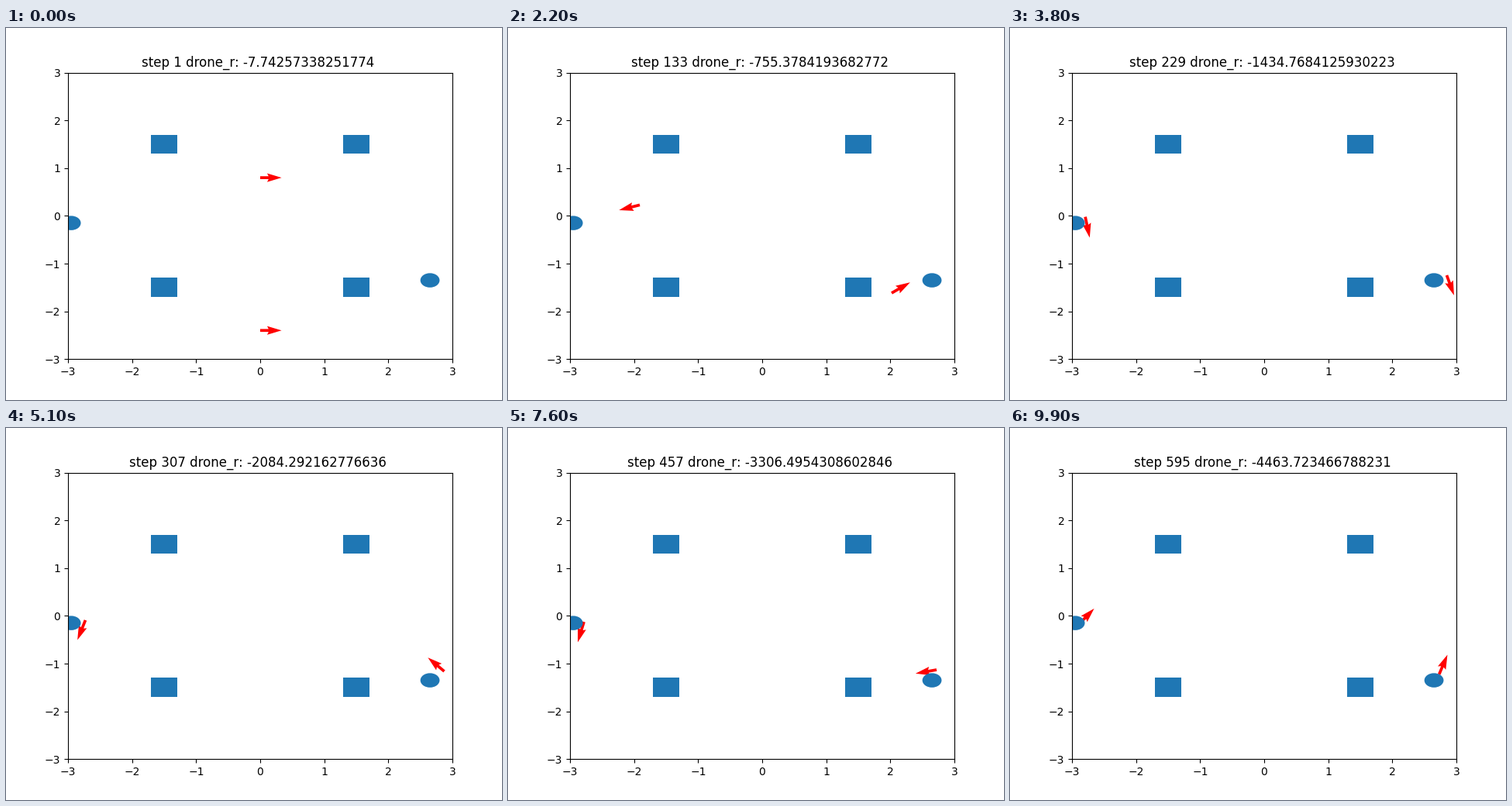
Animation of 640x480 px, one loop 10000 ms. Source, as a matplotlib script:

```python
import numpy as np
import matplotlib.pyplot as plt
from matplotlib.animation import FuncAnimation
from matplotlib.patches import Circle, Rectangle

FRAMES, STEP = 100, 6
SPIN = 50      # degrees turned per frame while circling a goal
ORBIT = 0.08   # radius of that circle
SWING = 1.4    # sideways overshoot of the first approach

# Key moments; everything between them follows from pose()
TIMES = np.array([0, 22, 38, 51, 66, 76, 99])
REWARDS = [-7.74257338251774, -755.3784193682772, -1434.7684125930223,
           -2084.292162776636, -2807.3504873506054, -3306.4954308602846,
           -4463.723466788231]

# Side of the stage, then (position, heading in degrees) at each key moment
DRONES = [
    (-1, [(0.8j, 0), (-1.911 + 0.228j, 194), (-2.793 - 0.02j, -78),
          (-2.728 - 0.09j, -112), (-2.879 + 0.013j, -12),
          (-2.782 - 0.125j, -107), (-2.886 - 0.169j, 46)]),
    (1, [(-2.4j, 0), (2.02 - 1.617j, 30), (2.849 - 1.244j, -70),
         (2.873 - 1.162j, 140), (2.788 - 1.162j, 12),
         (2.722 - 1.13j, 190), (2.73 - 1.226j, 67)]),
]


def unit(degrees):
    return np.exp(1j * np.radians(degrees))


def pose(side, keys, t):
    """Position and heading (as a unit vector) at frame t."""
    k = min(np.searchsorted(TIMES, t, "right"), len(TIMES) - 1) - 1
    gap = TIMES[k + 1] - TIMES[k]
    u = (t - TIMES[k]) / gap
    ease = 1 - (1 - u) ** 3
    (p, h), (q, g) = keys[k:k + 2]

    if k == 0:  # fly out past the goal and back
        swoop = side * SWING * np.sin(np.pi * u)
        return p + (q - p) * u + swoop, unit(h + (g - h) * ease)

    # circle the goal with as many whole turns as fit
    turn = g - h
    turn += 360 * np.round((side * SPIN * gap - turn) / 360)
    offset = -1j * side * ORBIT
    start, end = p - offset * unit(h), q - offset * unit(g)
    heading = unit(h + turn * u)
    return start + (end - start) * ease + offset * heading, heading


fig, ax = plt.subplots(figsize=(6.4, 4.8), dpi=100)
ax.set(xlim=(-3, 3), ylim=(-3, 3))
title = ax.set_title("")
arrows = ax.quiver([0, 0], [0, 0], [1, 1], [0, 0], color="r")

for cx in (-1.5, 1.5):
    for cy in (-1.5, 1.5):
        ax.add_patch(Rectangle((cx - 0.2, cy - 0.2), 0.4, 0.4))
for goal in ((-2.95, -0.15), (2.65, -1.35)):
    ax.add_patch(Circle(goal, 0.15))


def update(i):
    reward = float(np.interp(i, TIMES, REWARDS))
    # the trailing space is part of the centred label
    title.set_text(f"step {1 + STEP * i} drone_r: {reward} ")
    pos, heading = np.array([pose(*drone, i) for drone in DRONES]).T
    arrows.set_offsets(np.column_stack([pos.real, pos.imag]))
    arrows.set_UVC(heading.real, heading.imag)
    return arrows, title


anim = FuncAnimation(fig, update, frames=FRAMES, interval=100, repeat=True)
plt.show()
```
